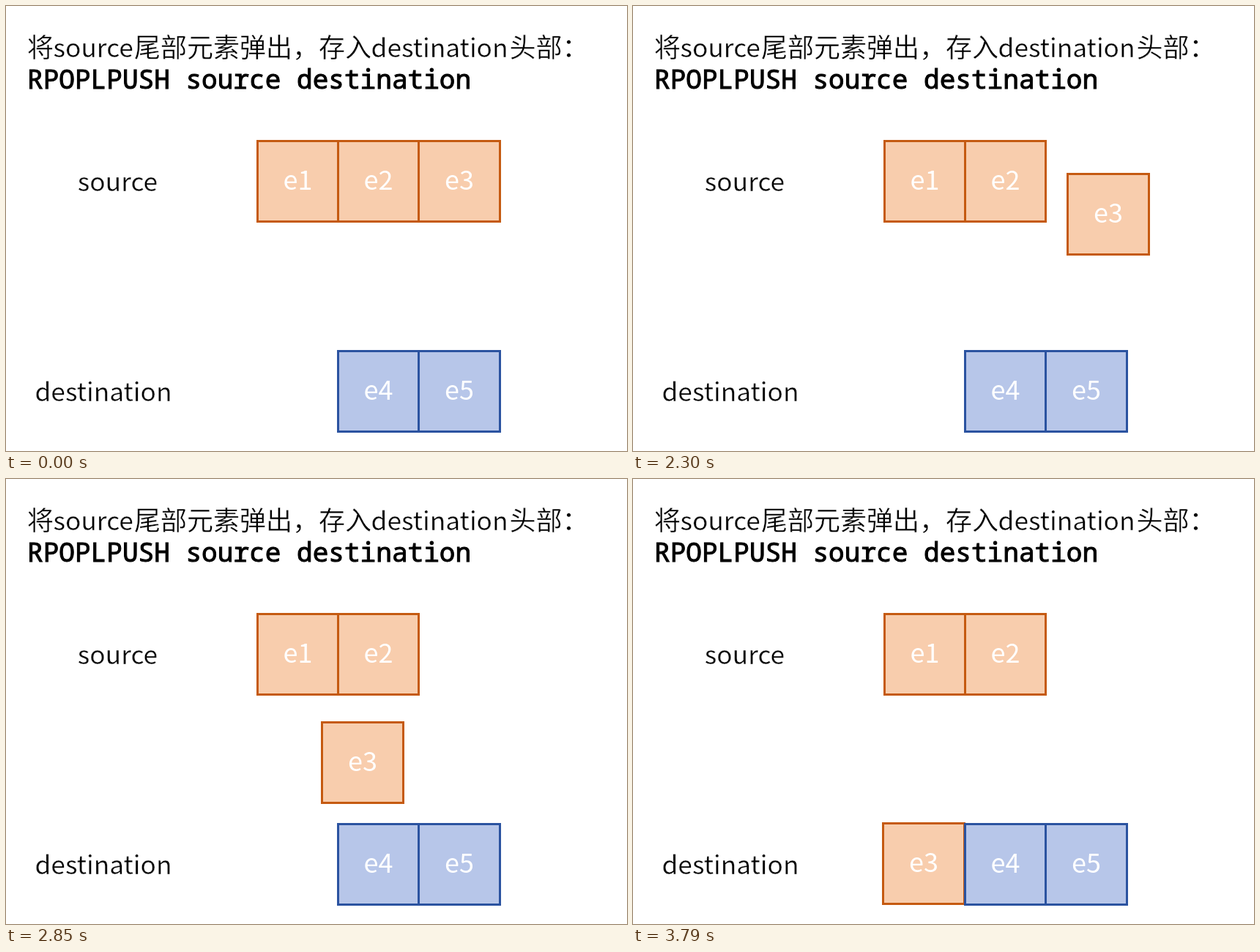
Write an HTML page that moves like this. It is 848 px wide and 608 px high and loops after 5.27 s.

```html
<!DOCTYPE html>
<html lang="zh-CN">
<head>
<meta charset="utf-8">
<title>RPOPLPUSH</title>
<style>
  html, body { margin: 0; width: 100%; height: 100%; overflow: hidden; background: #fff; }
  svg { display: block; }
  text { font-family: "Noto Sans CJK SC", "Noto Sans CJK", sans-serif; font-size: 36px; }
  .latin, .label { font-size: 35.3px; }
  /* A hairline in the background colour gives a lighter weight. */
  .title, .label { stroke: #fff; stroke-width: 0.4; }
  /* A thin outline gives a weight between regular and bold. */
  .command {
    font-family: "Noto Sans Mono", monospace; font-size: 36.1px; white-space: pre;
    stroke: #000; stroke-width: 1;
  }
  .label, .cell text { text-anchor: middle; }
  .cell rect { stroke-width: 3; }
  .cell text { fill: #fff; }
  .orange rect { fill: #f8cdad; stroke: #c55a11; }
  .blue rect { fill: #b7c6e9; stroke: #2b53a0; }
</style>
</head>
<body>
<svg id="stage" width="848" height="608" viewBox="0 0 848 608">
  <text class="title" y="70"><tspan x="29">将</tspan><tspan class="latin" x="64.5">source</tspan><tspan x="175">尾部元素弹出，存入</tspan><tspan class="latin" x="498.5">destination</tspan><tspan x="687.5">头部：</tspan></text>
  <text class="command" x="29" y="113">RPOPLPUSH source destination</text>
  <text class="label" x="152.5" y="253">source</text>
  <text class="label" x="133" y="540">destination</text>
</svg>
<script>
const LOOP = 5270;
const HOME = [562, 183];

// Bursts of evenly spaced steps: first time, last time, number of steps.
const BURSTS = [[1770, 2260, 8], [2300, 2810, 8], [2850, 3330, 8], [3400, 3790, 7]];
const stepTimes = BURSTS.flatMap(([first, last, count]) =>
  Array.from({ length: count }, (_, i) =>
    Math.floor((first + (last - first) * i / (count - 1)) / 10) * 10));

// Path of the moving cell: step, x, y.
const PATH = [
  [0, 579, 181], [3, 588, 187], [7, 592, 214], [8, 592, 228], [13, 521, 293],
  [15, 466, 315], [16, 430, 331], [23, 333, 430], [24, 333, 433],
  [27, 331, 452], [30, 340, 469]
];

const slope = (i, axis) =>
  (PATH[i + 1][axis] - PATH[i][axis]) / (PATH[i + 1][0] - PATH[i][0]);

// Harmonic mean of the neighbouring slopes keeps the curve from overshooting.
function tangent(i, axis) {
  if (i === 0) return slope(0, axis);
  if (i === PATH.length - 1) return slope(i - 1, axis);
  const a = slope(i - 1, axis), b = slope(i, axis);
  return a * b > 0 ? 2 * a * b / (a + b) : 0;
}

function pathAt(step, axis) {
  let i = 0;
  while (i < PATH.length - 2 && PATH[i + 1][0] <= step) i++;
  const p = PATH[i], q = PATH[i + 1], h = q[0] - p[0];
  const u = (step - p[0]) / h, v = 1 - u;
  return v * v * (1 + 2 * u) * p[axis] + u * u * (1 + 2 * v) * q[axis]
    + h * u * v * (v * tangent(i, axis) - u * tangent(i + 1, axis));
}

const stage = document.getElementById("stage");

function add(parent, tag, attributes) {
  const node = document.createElementNS("http://www.w3.org/2000/svg", tag);
  for (const name in attributes) node.setAttribute(name, attributes[name]);
  return parent.appendChild(node);
}

function place(cell, x, y) {
  cell.setAttribute("transform", `translate(${Math.round(x)} ${Math.round(y)})`);
}

function addCell(label, color, x, y, width = 113) {
  const cell = add(stage, "g", { class: `cell ${color}` });
  add(cell, "rect", { x: 1.5, y: 1.5, width: width - 3, height: 110 });
  add(cell, "text", { x: width / 2, y: 68 }).textContent = label;
  place(cell, x, y);
  return cell;
}

addCell("e1", "orange", 342, 183);
addCell("e2", "orange", 452, 183);
const moving = addCell("e3", "orange", ...HOME, 114);
addCell("e4", "blue", 452, 470);
addCell("e5", "blue", 562, 470, 114);

const start = performance.now();

function draw() {
  const time = (performance.now() - start) % LOOP;
  const step = stepTimes.filter(t => t <= time).length - 1;
  if (step < 0) place(moving, ...HOME);
  else place(moving, pathAt(step, 1), pathAt(step, 2));
  requestAnimationFrame(draw);
}
draw();
</script>
</body>
</html>
```
